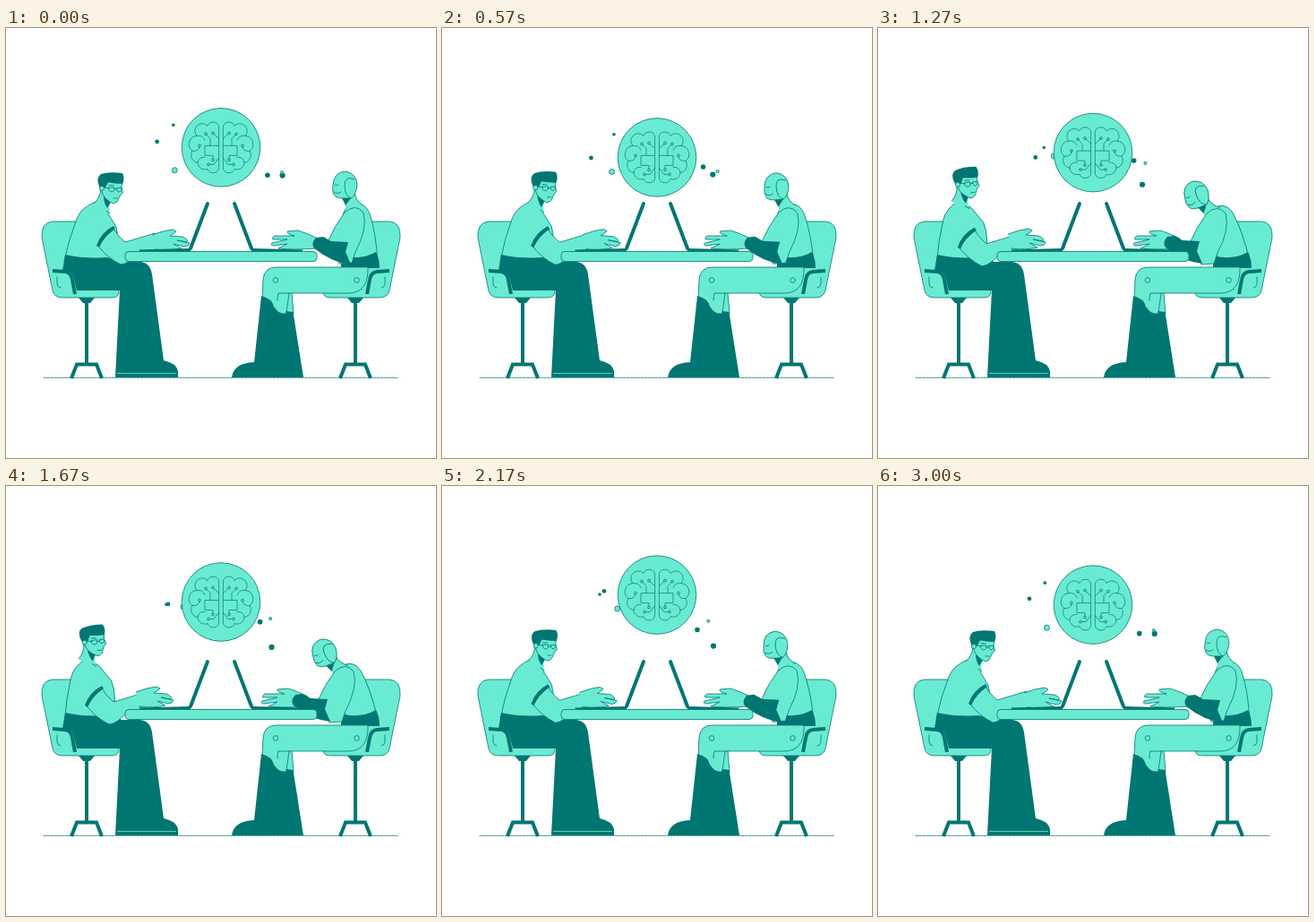
Write an HTML page that moves like this. It is 480 px wide and 480 px high and loops after 3030 ms.

```html
<!DOCTYPE html>
<html lang="en">
<head>
<meta charset="utf-8">
<title>Working with a robot</title>
<style>
  html, body { margin: 0; width: 100%; height: 100%; overflow: hidden; background: #fff; }
  svg { display: block; width: 100vw; height: 100vh; }
  .light { fill: #69ebd2; stroke: #007672; stroke-width: .8; stroke-linejoin: round; }
  .dark { fill: #007672; }
  .skin { fill: #69ebd2; }
  .line { fill: none; stroke: #007672; stroke-width: .8; stroke-linecap: round; stroke-linejoin: round; }
  .bar { fill: none; stroke: #007672; stroke-width: 4; }
</style>
</head>
<body>
<svg viewBox="0 0 480 480">
  <defs>
    <g id="seat">
      <path class="light" d="M52 216H84V292H126Q127 301 118 301H63Q54 301 52 293L40 234Q39 217 52 216Z"/>
      <path class="line" d="M57 278V286Q58 290 61 290"/>
      <path class="dark" d="M81 301H99L94 307H86Z"/>
      <path class="bar" d="M90 305V375M73 391L79 375.5H101L107 391"/>
    </g>
    <path id="rest" class="bar" d="M52 271L66 272Q73 273 74 281L77 297"/>
    <g id="laptop">
      <path class="bar" stroke-linecap="round" d="M225 196L206 246"/>
      <path class="dark" d="M148 247.5L206 246V249.5H150Z"/>
    </g>
    <g id="lobe">
      <path class="line" stroke-opacity=".85" d="M-2.5 -24A6.5 6 0 0 0 -15 -24A8 8 0 0 0 -27 -13A9.5 9.5 0 0 0 -32 4A8.5 8.5 0 0 0 -26 17A8 8 0 0 0 -15 24A6.5 6 0 0 0 -2.5 24Z
        M-2.5 -2H-18V9H-9V14M-2.5 -10L-9 -16M-12 -2V-10L-17 -15M-27 -13Q-20 -14 -18 -8M-32 4Q-24 5 -24 -2M-26 17Q-25 10 -18 11M-2.5 12L-8 19H-14"/>
      <g class="light">
        <circle cx="-9" cy="-16" r="1.4"/><circle cx="-17" cy="-15" r="1.4"/>
        <circle cx="-24" cy="-2" r="1.4"/><circle cx="-9" cy="14" r="1.4"/>
        <circle cx="-14" cy="19" r="1.4"/>
      </g>
    </g>
  </defs>

  <path class="line" stroke-dasharray="3 1" d="M42 390.3H438"/>
  <g id="dots"></g>
  <g id="brain">
    <circle class="light" r="43.8"/>
    <use href="#lobe"/><use href="#lobe" transform="scale(-1 1)"/>
  </g>

  <use href="#seat"/>
  <use href="#seat" transform="translate(480) scale(-1 1)"/>

  <!-- man -->
  <g id="manBody">
    <path class="light" d="M100 194Q84 200 79 213Q70 236 65 260L118 264Q128 240 123 222L112 204Z"/>
    <g id="manHead">
      <path class="skin" d="M98 196Q106 189 106 178L118 192Q114 198 116 207Q105 207 98 196Z"/>
      <path class="line" d="M98 196Q105 190 106 180M112 204L116 207"/>
      <path class="dark" d="M109 187L117 194L113 201Q109 195 109 187Z"/>
      <path class="light" d="M106 173Q106 184 110 189Q116 195 120 196Q125 195 126 190L128 186L130.5 184L129 178L130 172H108Z"/>
      <path class="dark" d="M104 177Q100 167 106 163Q115 160 130 162Q133 168 130 174Q121 174 114 172L111 178Q106 181 104 177Z"/>
      <circle class="light" cx="107" cy="179" r="2.6"/>
      <path class="line" d="M110 178L115 179M121 180H124M120 190H124M115 175.500L120 176"/>
      <path class="line" d="M115 178H121V181Q118 185 115 181ZM124 178.500H129V181Q126 185 124 181Z"/>
    </g>
  </g>
  <path class="dark" d="M66 253Q88 258 112 256L130 261H150Q161 262 163 275L176 371Q190 374 192 383V390H122L127 293H79L75 277Q73 271 63 271Z"/>
  <path d="M124 385.5H190" stroke="#69ebd2" stroke-width=".8"/>
  <g id="manArm">
    <path class="light" d="M170 247L150 249Q136 264 128 264Q112 256 102 242L119 222Q124 232 133 239Q150 234 166 229"/>
    <path class="dark" d="M120 221Q106 228 101 243L104 245Q109 233 122 224Z"/>
  </g>
  <path id="manHand" class="light" d="M163 231Q176 226 186 225L190 227Q187 230 183 232L197 233Q204 236 202 239L191 237L205 240Q204 244 199 244L187 241L196 246Q184 249 166 247"/>

  <!-- robot -->
  <g id="botBody">
    <path class="light" d="M380 200Q399 190 406 207Q413 228 415 262L384 264Q378 240 372 226L377 206Z"/>
    <g id="botHead">
      <path class="skin" d="M377 186L389 182Q390 192 398 198L380 206Z"/>
      <path class="line" d="M389 184Q390 192 398 198"/>
      <path class="dark" d="M375 190L387 187L379 198Z"/>
      <path class="light" d="M365 175Q366 161 379 160Q391 162 392 175Q391 186 385 190L376 190Q368 190 366 186L364.5 181Z"/>
      <path class="line" d="M389 169Q378 164 378 176Q378 187 385 190M366 183Q370 186 374 183M367 175Q369 177 371 175"/>
    </g>
  </g>
  <path class="dark" d="M374 254Q395 260 413 250Q417 258 417 268H374Z"/>
  <path id="botArm" class="light" d="M378 206Q390 195 399 206Q404 224 390 250L386 262L372 263L360 237Q366 222 378 206Z"/>
  <path id="botHand" class="light" d="M348 235Q336 229 326 226L314 227Q313 230 322 232L300 232Q296 234 298 236L314 236L297 240Q295 243 299 243L314 241L304 246Q320 248 346 246"/>
  <path id="botGlove" class="dark" d="M346 234L354 233L363 238L382 239L379 250L385 264Q364 262 344 246Q340 240 346 234Z"/>
  <path class="light" d="M286 301L287 281Q288 267 302 267H404Q405 296 382 296H319L321 319H300Z"/>
  <path class="line" d="M319 296H304Q303 299 303 304M316 296L313 318"/>
  <circle class="light" cx="301" cy="281.5" r="2.8"/>
  <circle class="light" cx="391.5" cy="281.5" r="2.8"/>
  <path class="dark" d="M285 299Q297 302 299 311Q305 320 312 319L313 316L320.5 317L332 390H252Q254 374 277 373Z"/>

  <use href="#rest"/>
  <use href="#rest" transform="translate(480) scale(-1 1)"/>
  <rect class="light" x="133" y="249.5" width="214" height="11" rx="4"/>
  <use href="#laptop"/>
  <use href="#laptop" transform="translate(480) scale(-1 1)"/>
</svg>
<script>
const LOOP = 3030;
const $ = id => document.getElementById(id);

function ease(t, from, to) {
  const u = Math.min(1, Math.max(0, (t - from) / (to - from)));
  return u * u * (3 - 2 * u);
}

// 0 at rest, 1 when fully leaned
const lean = (t, start, full, back) => ease(t, start, full) - ease(t, 1700, back);

function pose(id, k, dx, dy, turn = 0, px = 0, py = 0) {
  $(id).setAttribute('transform',
    `translate(${dx * k} ${dy * k}) rotate(${turn * k} ${px} ${py})`);
}

// Each dot drifts on an ellipse: centre, reach and phase in degrees
const dots = [
  { kind: 'dark', r: 1.8, x: [184, 8, 70], y: [121, 13, 168] },
  { kind: 'dark', r: 2.4, x: [174, 8, 228], y: [132, 17, 108] },
  { kind: 'light', r: 3, x: [193, 5, 200], y: [148, 14, 40] },
  { kind: 'dark', r: 2.8, x: [288, 4.5, 30], y: [157, 9, -35] },
  { kind: 'dark', r: 3.1, x: [302, 7, -20], y: [171.5, 9, 220] },
  { kind: 'light', r: 1.6, x: [302, 7, 30], y: [155, 7, 25] }
];
for (const dot of dots) {
  dot.el = document.createElementNS('http://www.w3.org/2000/svg', 'circle');
  dot.el.setAttribute('class', dot.kind);
  dot.el.setAttribute('r', dot.r);
  $('dots').append(dot.el);
}

function draw(t) {
  const angle = t / LOOP * 2 * Math.PI;
  const drift = ([mid, reach, phase]) => mid + reach * Math.cos(angle - phase * Math.PI / 180);

  $('brain').setAttribute('transform', `translate(240 ${133.3 + 12 * Math.sin(angle)})`);
  for (const { el, x, y } of dots) {
    el.setAttribute('cx', drift(x));
    el.setAttribute('cy', drift(y));
  }

  const man = lean(t, 300, 1450, 2300);
  pose('manBody', man, 0, 0, -8.5, 85, 258);
  pose('manHead', man, -7, -3);
  pose('manArm', man, -13, 2);
  pose('manHand', lean(t, 100, 1350, 2700), -18, -1);

  const bot = lean(t, 350, 1100, 2400);
  pose('botBody', bot, 0, 0, -10, 400, 262);
  pose('botHead', bot, -9, 4, -10, 378, 176);
  pose('botArm', bot, -11, 1);
  pose('botGlove', bot, -23, -1);
  pose('botHand', lean(t, 300, 1000, 2500), -11, 0);
}

const start = performance.now();
function tick() {
  draw((performance.now() - start) % LOOP);
  requestAnimationFrame(tick);
}
tick();
</script>
</body>
</html>
```
